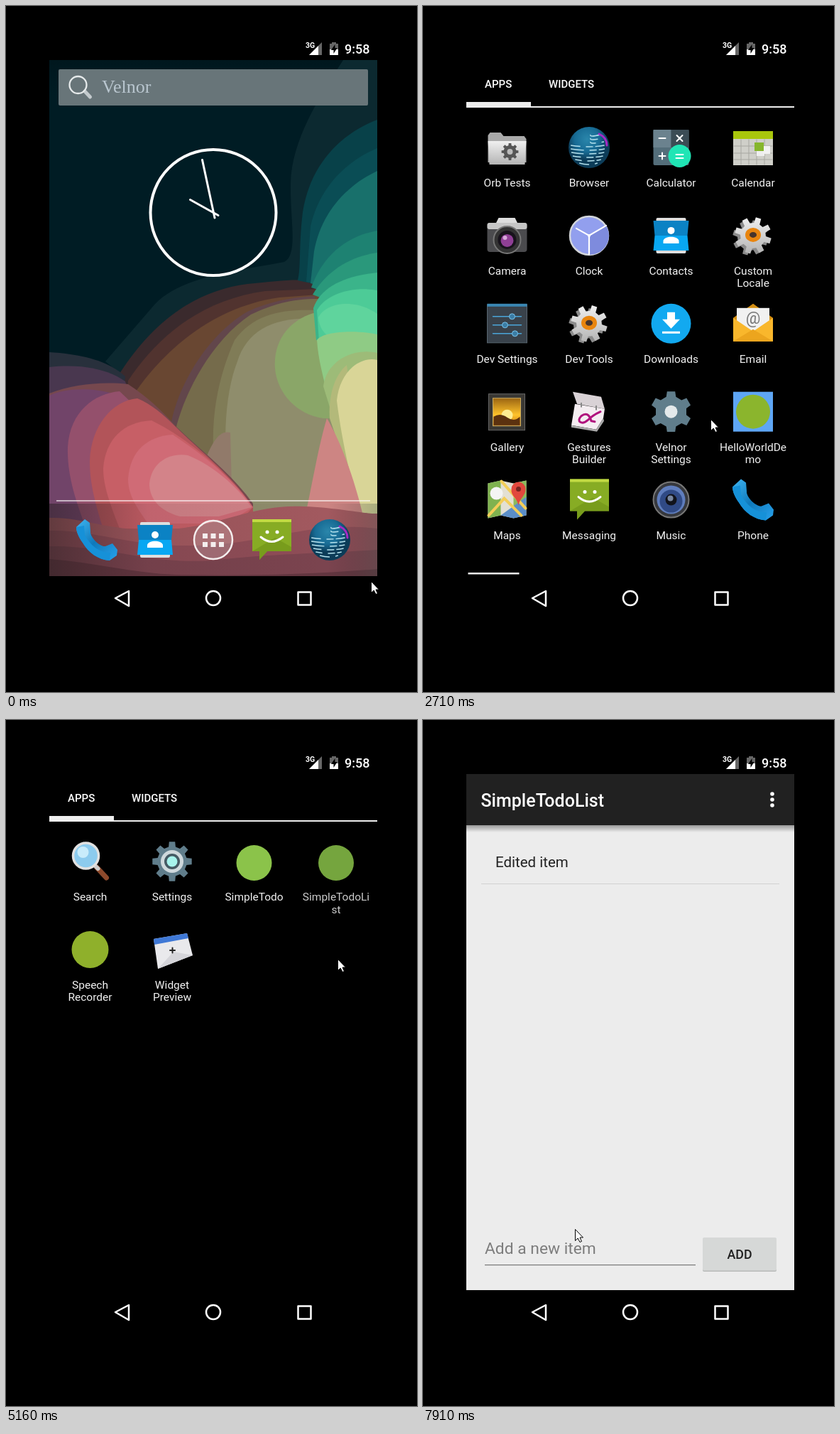
Animation of 579 by 965 pixels, one loop 8 s. Source, as an HTML page:

```html
<!DOCTYPE html>
<html lang="en">
<head>
<meta charset="utf-8">
<title>Phone launcher</title>
<style>
html, body { margin: 0; height: 100%; overflow: hidden; background: #000; }
svg { display: block; width: 100%; height: 100%; font-family: Roboto, "Noto Sans", sans-serif; }
.label { font-size: 15.5px; fill: #f2f2f2; text-anchor: middle; }
.medium { font-weight: 500; }
.line { fill: none; stroke: #fff; stroke-linecap: round; stroke-linejoin: round; }
</style>
</head>
<body>
<svg viewBox="0 0 579 965">
  <defs>
    <clipPath id="tall"><rect x="61" y="44" width="462" height="820"/></clipPath>
    <clipPath id="screen"><rect x="61" y="76" width="462" height="726"/></clipPath>
    <linearGradient id="sky" x2="0" y2="1"><stop stop-color="#00141a"/><stop offset=".1" stop-color="#001c24"/></linearGradient>
    <linearGradient id="side"><stop stop-color="#221c1e" stop-opacity=".5"/><stop offset=".3" stop-color="#301a20" stop-opacity=".1"/><stop offset=".85" stop-color="#301a20" stop-opacity="0"/><stop offset="1" stop-color="#3c5048" stop-opacity=".3"/></linearGradient>
    <radialGradient id="globe" cx=".45" cy=".3"><stop stop-color="#2a86ab"/><stop offset=".6" stop-color="#186c95"/><stop offset="1" stop-color="#0c3c58"/></radialGradient>
    <linearGradient id="handset" x2="1" y2="1"><stop stop-color="#3fb5f2"/><stop offset=".5" stop-color="#0f79bb"/><stop offset="1" stop-color="#28a2ec"/></linearGradient>
    <linearGradient id="silver" x2="0" y2="1"><stop stop-color="#f0f0f0"/><stop offset="1" stop-color="#b4b4b4"/></linearGradient>
    <linearGradient id="dusk" x2="0" y2="1"><stop stop-color="#9a6412"/><stop offset=".6" stop-color="#ffc32b"/><stop offset="1" stop-color="#c47612"/></linearGradient>
    <linearGradient id="fall" x2="0" y2="1"><stop stop-color="#000" stop-opacity=".35"/><stop offset="1" stop-color="#000" stop-opacity="0"/></linearGradient>
  </defs>
  <rect width="579" height="965"/>

  <g clip-path="url(#tall)">
    <rect x="61" y="44" width="462" height="820" fill="url(#sky)"/>
    <path fill="#0c2930" d="M523 76H475C440 130 402 190 401 250C400 300 412 350 392 360C330 372 240 380 205 425L140 500L165 520H523Z"/>
    <path fill="#3a2a2d" d="M160 517C210 440 270 400 340 391C390 386 420 382 440 390L523 420V864H61V530Z"/>
    <path fill="#51332f" d="M172 527C220 455 285 412 365 401L440 398L523 420V864H150Z"/>
    <path fill="#694732" d="M183 542C230 475 300 422 385 410L440 406L523 440V864H160Z"/>
    <path fill="#62464b" d="M232 590C240 540 280 465 340 430C370 416 400 410 435 408V600Z"/>
    <path fill="#756b4b" d="M238 600C250 545 290 470 345 434C375 420 400 412 440 412L500 702V864H240Z"/>
    <path fill="#807c57" d="M300 690C280 590 300 520 322 470C350 432 390 426 440 428L480 600V864H300Z"/>
    <path fill="#8f8d6c" d="M322 700C303 640 306 550 326 500C340 455 380 436 440 440L470 560L500 740H330Z"/>
    <path fill="#917a6a" d="M280 640C290 615 300 596 316 600L318 680Z"/>
    <path fill="#084149" d="M523 160C470 180 428 225 418 290C412 340 416 365 411 386L523 410Z"/>
    <path fill="#0a4d55" d="M523 200C475 220 440 260 429 310L423 388L523 410Z"/>
    <path fill="#18706b" d="M523 232C475 255 443 295 434 345L429 390L523 420Z"/>
    <path fill="#1e8272" d="M523 316C475 325 445 355 430 396L523 425Z"/>
    <path fill="#2a987b" d="M523 347C480 353 450 376 432 406L523 440Z"/>
    <path fill="#8aa668" d="M379 510C376 470 400 442 433 432L523 440V580H447C410 575 382 545 379 510Z"/>
    <path fill="#3bb48a" d="M523 375C475 380 443 396 433 425L437 470L523 490Z"/>
    <path fill="#4dcb97" d="M523 400C490 394 452 404 438 428L441 472L523 490Z"/>
    <path fill="#5fd49d" d="M523 433C490 410 450 418 440 438C443 470 470 475 523 480Z"/>
    <path fill="#8fcb85" d="M523 462C490 455 446 458 438 470C440 500 449 530 455 555L523 520Z"/>
    <path fill="#9dbb78" d="M523 488C490 480 452 498 447 535L464 590L523 540Z"/>
    <path fill="#b3b97a" d="M480 505C462 520 454 550 456 580L500 712H510Z"/>
    <path fill="#d9d597" d="M523 498C498 492 470 515 466 555C474 620 490 680 500 720H523Z"/>
    <path fill="#cd8583" d="M452 580C470 610 490 660 505 725H420C434 660 440 620 452 580Z"/>
    <path fill="#28303c" d="M61 487C110 490 145 500 168 521L160 600H61Z"/>
    <path fill="#49374f" d="M61 508C110 503 145 512 168 528L190 600V864H61Z"/>
    <path fill="#76484e" d="M61 545C95 532 135 528 172 532C200 550 222 572 238 590C280 630 320 660 348 700V864H61Z"/>
    <path fill="#714469" d="M61 548C80 538 120 536 150 545V760H61Z"/>
    <path fill="#94506c" d="M87 620C90 570 125 545 160 542L200 580V740H115C95 690 86 655 87 620Z"/>
    <path fill="#b25459" d="M118 640C120 590 150 555 185 552C205 560 222 575 238 591C280 632 320 662 348 705V745H140C122 690 118 665 118 640Z"/>
    <path fill="#c75f66" d="M137 650C140 610 165 585 205 583C240 600 300 640 348 705L320 735H160C142 690 137 670 137 650Z"/>
    <path fill="#d06b76" d="M172 665C175 625 200 605 235 603C275 630 315 660 348 705L310 728H200C180 700 172 685 172 665Z"/>
    <path fill="#d38389" d="M202 672C205 642 230 628 256 632C290 645 325 675 346 705L300 718H245C215 710 202 692 202 672Z"/>
    <path fill="#a2595f" d="M61 720C110 718 150 742 230 736C300 732 350 700 420 704C470 706 500 714 523 714V864H61Z"/>
    <path fill="#8f4d57" d="M61 738C130 736 180 765 290 758C380 752 430 725 523 735V864H61Z"/>
    <path fill="#7b444f" d="M61 760C140 758 200 786 290 780C380 770 450 770 523 765V864H61Z"/>
    <path fill="#633640" d="M61 778C120 782 180 798 240 800C330 802 430 800 523 792V864H61Z"/>
    <rect x="61" y="700" width="462" height="164" fill="url(#side)"/>
  </g>

  <g clip-path="url(#screen)">
    <rect id="shade" x="61" y="76" width="462" height="726"/>
    <g id="home">
      <rect x="74" y="89" width="436" height="51" rx="2" fill="#687579"/>
      <path d="M111 120L118.500 128" stroke="#c3cacd" stroke-width="5" stroke-linecap="round"/>
      <circle cx="101.500" cy="111" r="12" fill="none" stroke="#e6eaeb" stroke-width="2.300"/>
      <text x="135" y="122" font-size="26" fill="#b9c6cf" style="font-family:'Liberation Serif',serif">Velnor</text>
      <rect x="71" y="695" width="442" height="2" fill="#fff" opacity=".6"/>
      <g id="dock"></g>
      <circle cx="292" cy="751" r="27" fill="#fff" fill-opacity=".18" stroke="#f4eeee" stroke-width="2.500"/>
      <path d="M277 745.500h30M277 757.500h30" stroke="#f4eeee" stroke-width="7" stroke-dasharray="7 4.500"/>
      <g id="clock" class="line">
        <circle cx="292" cy="290.500" r="88.500" stroke-width="4"/>
        <path stroke-width="3" d="M294 298L276.500 216.500M299 294.500L259.500 272.500"/>
      </g>
    </g>

    <g id="drawer">
      <g class="medium" font-size="15" fill="#fff">
        <text x="87" y="115">APPS</text><text x="177" y="115">WIDGETS</text>
      </g>
      <path fill="#eee" d="M61 135h91v6h371v2H61Z"/>
      <g id="page2"></g>
      <g id="page1"></g>
      <rect id="marker" x="63.500" y="797" width="72" height="2.500" fill="#f2f2f2"/>
    </g>

    <rect id="window" x="61" y="76" width="462" height="726" fill="#ececec"/>
    <g id="app">
      <rect x="61" y="76" width="462" height="726" fill="#ececec"/>
      <rect x="61" y="148" width="462" height="10" fill="url(#fall)"/>
      <rect x="61" y="76" width="462" height="72" fill="#212121"/>
      <text class="medium" x="81.500" y="121.500" font-size="25" fill="#fff">SimpleTodoList</text>
      <path class="line" stroke-width="5.600" d="M492 104h0M492 112h0M492 120h0"/>
      <text x="102" y="207" font-size="20.500" fill="#222">Edited item</text>
      <rect x="82" y="230" width="420" height="1" fill="#d2d2d2"/>
      <text x="87" y="751" font-size="22.800" fill="#7d7d7d">Add a new item</text>
      <rect x="87" y="766" width="297" height="1.200" fill="#777"/>
      <rect x="394" y="729" width="104" height="47" rx="2" fill="#b9bbba"/>
      <rect x="394" y="728" width="104" height="46.500" rx="2" fill="#d6d8d7"/>
      <text class="medium" x="446" y="758" font-size="17.800" fill="#212121" text-anchor="middle">ADD</text>
    </g>
  </g>

  <rect id="top" x="61" y="44" width="462" height="32"/>
  <rect id="bottom" x="61" y="802" width="462" height="62"/>
  <g fill="#fff">
    <text x="422" y="59" font-size="10.500" font-weight="700">3G</text>
    <path fill="#666" d="M445 51V69H427Z"/><path d="M440 56V69H427Z"/>
    <path fill="#666" d="M459 51h6v2h3v8h-12v-8h3Z"/><path d="M456 61h12v8h-12Z"/>
    <path fill="#000" d="M463.500 54L458 62H461.500V67L466.500 59H463.500Z"/>
    <text class="medium" x="477" y="67" font-size="18">9:58</text>
  </g>
  <g class="line" stroke-width="2.500">
    <path d="M154 833L173 823V844Z"/><circle cx="292" cy="833" r="10"/><path d="M411.500 824.500h18v18h-18Z"/>
  </g>
  <path id="cursor" fill="#fff" stroke="#000" d="M.5 .5V16.500L4.200 13L7 18.500L9.500 17.400L7 12H11.500Z"/>
</svg>

<script>
const $ = id => document.getElementById(id);
const path = (d, fill, extra = '') => `<path d="${d}" fill="${fill}" ${extra}/>`;
const disc = (x, y, r, fill, extra = '') => `<circle cx="${x}" cy="${y}" r="${r}" fill="${fill}" ${extra}/>`;
const box = (x, y, w, h, fill, extra = '') => `<rect x="${x}" y="${y}" width="${w}" height="${h}" fill="${fill}" ${extra}/>`;
const stroke = (d, color, width) => path(d, 'none', `stroke="${color}" stroke-width="${width}" stroke-linecap="round"`);

function gear(teeth, outer, inner, fill, turn = 0) {
  const points = [];
  for (let i = 0; i < teeth; i++) {
    for (const [offset, r] of [[-.3, inner], [-.19, outer], [.19, outer], [.3, inner]]) {
      const a = (i + offset) / teeth * 2 * Math.PI + turn - Math.PI / 2;
      points.push(`${(r * Math.cos(a)).toFixed(1)} ${(r * Math.sin(a)).toFixed(1)}`);
    }
  }
  return path(`M${points.join('L')}Z`, fill);
}

function globeLines() {
  let out = '';
  for (let y = -18; y <= 22; y += 5) {
    const w = Math.sqrt(26 * 26 - y * y);
    const start = y < -4 ? 2 : -w;
    out += path(`M${start} ${y}Q0 ${y + 4} ${w * .85} ${y}`, 'none',
      `stroke="#b5e2ee" stroke-width="1.4" stroke-dasharray="${14 + 5 * Math.sin(y)} 8 10 3"`);
  }
  return out;
}

const toolGear = `<g transform="translate(-4 3)">${gear(8, 25, 18, '#8b8b8b', .3)}</g>`
  + gear(8, 26, 18, 'url(#silver)', .3)
  + '<ellipse cx="0" cy="-1" rx="8" ry="7" fill="#46342c" stroke="#e8850f" stroke-width="6"/>';

const icons = {
  folder: path('M-27 -17L-24 -21H-9L-5 -16H24L27 -12V21H-27Z', '#aaa')
    + path('M-27 -9H27L25 24H-25Z', 'url(#silver)')
    + `<g transform="translate(4 6)">${gear(8, 12, 9, '#555')}${disc(0, 0, 4, '#bbb')}</g>`,
  globe: disc(0, 0, 29, 'url(#globe)') + globeLines() + stroke('M14 -19Q25 -14 25 -3', '#a52ac4', 3),
  calculator: box(-25, -25, 50, 50, '#546e7a', 'rx="2"') + box(-25, -25, 25, 25, '#6b828e')
    + box(0, -25, 25, 25, '#3b4c55') + disc(12, 12, 16, '#20e5b5')
    + stroke('M-17 -13h9M8 -17l8 8m0 -8l-8 8M-17 12h9m-4.500 -4.500v9M7 10h10M7 15h10', '#fff', 2),
  calendar: box(-28, -23, 56, 48, '#cfcfc9') + box(-28, -23, 56, 11, '#a9c60c')
    + stroke('M-27 -2H27M-27 8H27M-27 17H27M-17 -11V24M-6 -11V24M5 -11V24M16 -11V24', '#a7a7a1', 1)
    + box(5, 1, 11, 11, '#eee') + box(14, -2, 10, 11, '#f2f2f2') + box(2, -7, 13, 12, '#86b62c'),
  camera: path('M-12 -25H11L15 -17H-16Z', '#ddd') + box(-28, -18, 56, 41, '#4b4b4e', 'rx="4"')
    + box(-28, -18, 56, 9, '#c6c6c6', 'rx="3"') + disc(0, 6, 19, '#333', 'stroke="#777" stroke-width="2"')
    + disc(0, 6, 13, '#18131c') + disc(0, 7, 9, '#8f3f95') + disc(-3, 3, 3, '#d9a8dc'),
  clock: disc(0, 0, 27, '#929fee', 'stroke="#d2d5da" stroke-width="2.5"')
    + path('M0 0L24 -14A27 27 0 0 1 0 27Z', '#7e8bdd') + stroke('M0 26V0L24 -14M0 0L-18 -10', '#fff', 2.2) + disc(0, 0, 2, '#fff'),
  contacts: box(-21, -25, 42, 50, '#dedede', 'rx="2"') + path('M-25 -21H25L23 0H-23Z', '#0b82c4')
    + path('M-23 0H23L25 21H-25Z', '#08a7f2') + disc(0, -7, 5, '#fff') + path('M-11 11V7C-9 0 9 0 11 7V11Z', '#fff'),
  tools: toolGear,
  sliders: box(-28, -27, 56, 54, '#39424b', 'stroke="#596570"') + box(-28, -28, 56, 4, '#3a87b3')
    + stroke('M-20 -10H20M-20 2H20M-20 14H20', '#4ba6da', 1.5)
    + [[7, -10], [-3, 2], [11, 14]].map(([x, y]) => disc(x, y, 4, '#3b7da5', 'stroke="#7bc4ec"')).join(''),
  download: disc(0, 0, 28, '#12a9f0') + path('M-5.500 -16H5.500V-6H12.500L0 7L-12.500 -6H-5.500ZM-12.500 11H12.500V14H-12.500Z', '#fff'),
  email: path('M-28 -8L0 -28L28 -8V25H-28Z', '#d38e12') + box(-23, -22, 46, 42, '#f1f1f1')
    + '<text y="0" font-size="23" fill="#777" text-anchor="middle">@</text>'
    + path('M-28 -8L0 11L28 -8V25H-28Z', '#f9b72c') + path('M-28 25L0 8L28 25Z', '#eca51e'),
  gallery: box(-26, -25, 51, 51, '#3a3834', 'stroke="#666"') + box(-20, -19, 39, 39, 'url(#dusk)', 'stroke="#c8ab62"')
    + disc(0, 5, 8, '#ffed91') + path('M-19 7Q-10 1 0 8T18 7V19H-19Z', '#5b310f'),
  notepad: path('M-23 -28L17 -21L22 -4L-17 -11Z', '#d9d2d6') + path('M-20 -11L22 -4L20 9L10 25L-25 19Z', '#f4edf1')
    + path('M-25 19L10 25L20 9L21 13L11 28L-25 22Z', '#aaa') + stroke('M-11 -12v5M10 -8v5', '#888', 2)
    + stroke('M16 0Q5 5 -2 12C-10 19 -19 14 -11 6C-3 0 1 6 3 13L8 14', '#b0127d', 3),
  badgeGear: gear(6, 29, 22, '#607d8b') + disc(0, 0, 9, '#e4e9eb'),
  demo: box(-28, -28, 56, 56, '#5ea6f5') + disc(0, 0, 24, '#8bb52d'),
  map: path('M-27 -23L-9 -27L9 -23L27 -27V22L9 26L-9 22L-27 26Z', '#e3e0d3') + path('M-27 -23L-9 -27V22L-27 26Z', '#7fb24f')
    + path('M9 -23L27 -27V8L9 20Z', '#8cbb5c') + path('M-9 22L27 -4V22L9 26Z', '#5b8ec8')
    + stroke('M-26 22L-4 -2L20 22M-8 -26L26 12', '#f3ce58', 4) + disc(-15, -9, 9, '#f4f4f4')
    + path('M16 8C14 -3 5 -5 6 -15A10 10 0 0 1 26 -15C26 -5 18 -3 16 8Z', '#e1483d') + disc(16, -15, 3.5, '#772520'),
  message: path('M-27 -29H28V16H-6L-17 28V16H-27Z', '#87ac24') + box(-27, -29, 55, 4, '#c2da43')
    + path('M-27 16L5 -3L28 10V16H-6L-17 28V16Z', '#6f9118', 'opacity=".6"')
    + disc(-6, -11, 2.5, '#fff') + disc(8, -11, 2.5, '#fff') + stroke('M-15 -4Q0 9 16 -4', '#fff', 3),
  speaker: disc(0, 0, 25, '#36383d', 'stroke="#777" stroke-width="2"') + disc(0, 0, 20, '#5f7dbd')
    + disc(0, 2, 16, '#304a85') + disc(0, 0, 8, '#11131b') + disc(-1, -2, 4, '#79879f'),
  phone: path('M-29 -18L-17 -29L-10 -24L-9 -12C-10 -4 4 10 12 9L22 5L29 14L28 22L18 29C2 28 -12 18 -20 4C-26 -4 -29 -12 -29 -18Z', 'url(#handset)')
    + path('M-29 -18L-18 -20L-17 -7C-9 8 3 18 19 18L18 29C2 28 -12 18 -20 4C-26 -4 -29 -12 -29 -18Z', '#1691d8'),
  lens: stroke('M9 8L23 23', '#8e4a2c', 7) + stroke('M7 6L11 10', '#ccc', 6)
    + disc(-6, -8, 18, '#8ccbee', 'stroke="#e1e1e1" stroke-width="3.5"') + disc(-10, -13, 8, '#c9ecfb'),
  settings: gear(8, 28, 21, '#607d8b') + disc(0, 0, 16, '#cfd8dc') + disc(0, 0, 11, '#455a64') + disc(0, 0, 7.5, '#a7f3ec'),
  green: disc(0, 2, 25, '#8bc34a'),
  olive: disc(0, 0, 26, '#8fb02b'),
  card: path('M-26 -15L21 -23L29 8L-20 27Z', '#e9e9ec') + path('M-26 -15L21 -23L23 -16L-25 -7Z', '#3f78d6')
    + path('M-20 27L2 3L29 8Z', '#d5d5da') + stroke('M-3 1h7M.5 -2.500v7', '#222', 2),
};

const place = (name, x, y) => `<g transform="translate(${x} ${y})">${icons[name]}</g>`;

// Each entry is "icon|first line|second line", four to a row.
function grid(entries) {
  return entries.map((entry, i) => {
    const [icon, ...lines] = entry.split('|');
    const x = 118.5 + i % 4 * 115.5, y = 199 + Math.floor(i / 4) * 123.9;
    const text = lines.map((s, n) => `<text class="label" x="${x}" y="${y + 55 + n * 17.5}">${s}</text>`).join('');
    return `<g>${place(icon, x, y)}${text}</g>`;
  }).join('');
}

$('page1').innerHTML = grid([
  'folder|Orb Tests', 'globe|Browser', 'calculator|Calculator', 'calendar|Calendar',
  'camera|Camera', 'clock|Clock', 'contacts|Contacts', 'tools|Custom|Locale',
  'sliders|Dev Settings', 'tools|Dev Tools', 'download|Downloads', 'email|Email',
  'gallery|Gallery', 'notepad|Gestures|Builder', 'badgeGear|Velnor|Settings', 'demo|HelloWorldDe|mo',
  'map|Maps', 'message|Messaging', 'speaker|Music', 'phone|Phone']);
$('page2').innerHTML = grid([
  'lens|Search', 'settings|Settings', 'green|SimpleTodo', 'green|SimpleTodoLi|st',
  'olive|Speech|Recorder', 'card|Widget|Preview']);
$('page2').children[3].id = 'launched';
$('dock').innerHTML = ['phone', 'contacts', '', 'message', 'globe']
  .map((name, i) => name && place(name, 128 + 82 * i, 751)).join('');

// Held poses: every step is [start in ms, ...values].
const LOOP = 8000;
let css = '';
function hold(id, steps, format) {
  const frames = steps.map(([t, ...v]) => `${t / LOOP * 100}%{${format(...v)}}`).join('');
  css += `@keyframes ${id}{${frames}}#${id}{animation:${id} ${LOOP}ms step-end infinite}`;
}
const move = (x, y) => `transform:translate(${x}px,${y}px)`;
const fade = o => `opacity:${o}`;
const zoom = (cx, cy) => (s, o = 1, sx = s) =>
  `transform:translate(${cx * (1 - sx)}px,${cy * (1 - s)}px) scale(${sx},${s});opacity:${o}`;

hold('cursor', [
  [0, 514, 809], [720, 498, 813], [860, 474, 819], [980, 446, 823], [1100, 424, 823], [1380, 421, 822],
  [1520, 404, 815], [1640, 352, 790], [1760, 315, 770], [1880, 299, 765], [2160, 303, 771], [2280, 335, 715],
  [2430, 381, 622], [2550, 398, 596], [2710, 405, 581], [2850, 440, 560], [2970, 480, 540], [3120, 500, 532],
  [3245, 511, 527], [3370, 513, 525], [3520, 420, 520], [3670, 330, 505], [3820, 230, 490], [3940, 162, 483],
  [4060, 260, 420], [4180, 396, 318], [4330, 442, 240], [4480, 455, 232], [4605, 459, 229], [4730, 459, 236],
  [5030, 462, 280], [5160, 467, 336], [7230, 386, 351], [7370, 345, 504], [7510, 302, 590], [7635, 265, 650],
  [7760, 241, 682], [7910, 214, 716]], move);
hold('shade', [[0, 0], [2430, .8], [2550, .97], [2710, 1]], fade);
hold('home', [[0, 1], [2430, .25], [2550, 0]], fade);
hold('clock', [[0, 1], [2280, .92], [2430, .735]], zoom(292, 420));
hold('drawer', [[0, 1.655, 0], [2430, 1.655, .82], [2550, 1.15, .96], [2710, 1]], zoom(292, 440));
hold('page1', [[0, 0, 0], [3670, -90, 0], [3820, -300, 0], [3940, -462, 0]], move);
hold('page2', [[0, .74, 0], [3670, .78, .12], [3820, .88, .5], [3940, .985, .95], [4060, .997], [4180, 1]], zoom(292, 400));
hold('marker', [[0, 0, 1], [3120, 0, .7], [3245, 0, .35], [3370, 0, 0], [3670, 15, 1], [3820, 49, 1], [3940, 75.5, 1],
  [4480, 75.5, .85], [4605, 75.5, .7], [4730, 75.5, .5], [4880, 75.5, .3], [5030, 75.5, .15], [5160, 75.5, 0]],
  (x, o) => `${move(x, 0)};${fade(o)}`);
hold('launched', [[0, 1], [4880, .85]], fade);
hold('window', [[0, .788, 0], [5870, .788, 1, .8], [5990, .97], [6140, 1]], zoom(511, 185));
hold('app', [[0, 0], [6140, .5], [6260, 1]], fade);
hold('top', [[0, 1], [5870, .45], [5990, 1]], fade);
hold('bottom', [[0, 1], [5870, .25], [6140, .5], [6260, .8], [6380, 1]], fade);
document.head.appendChild(document.createElement('style')).textContent = css;
</script>
</body>
</html>
```
